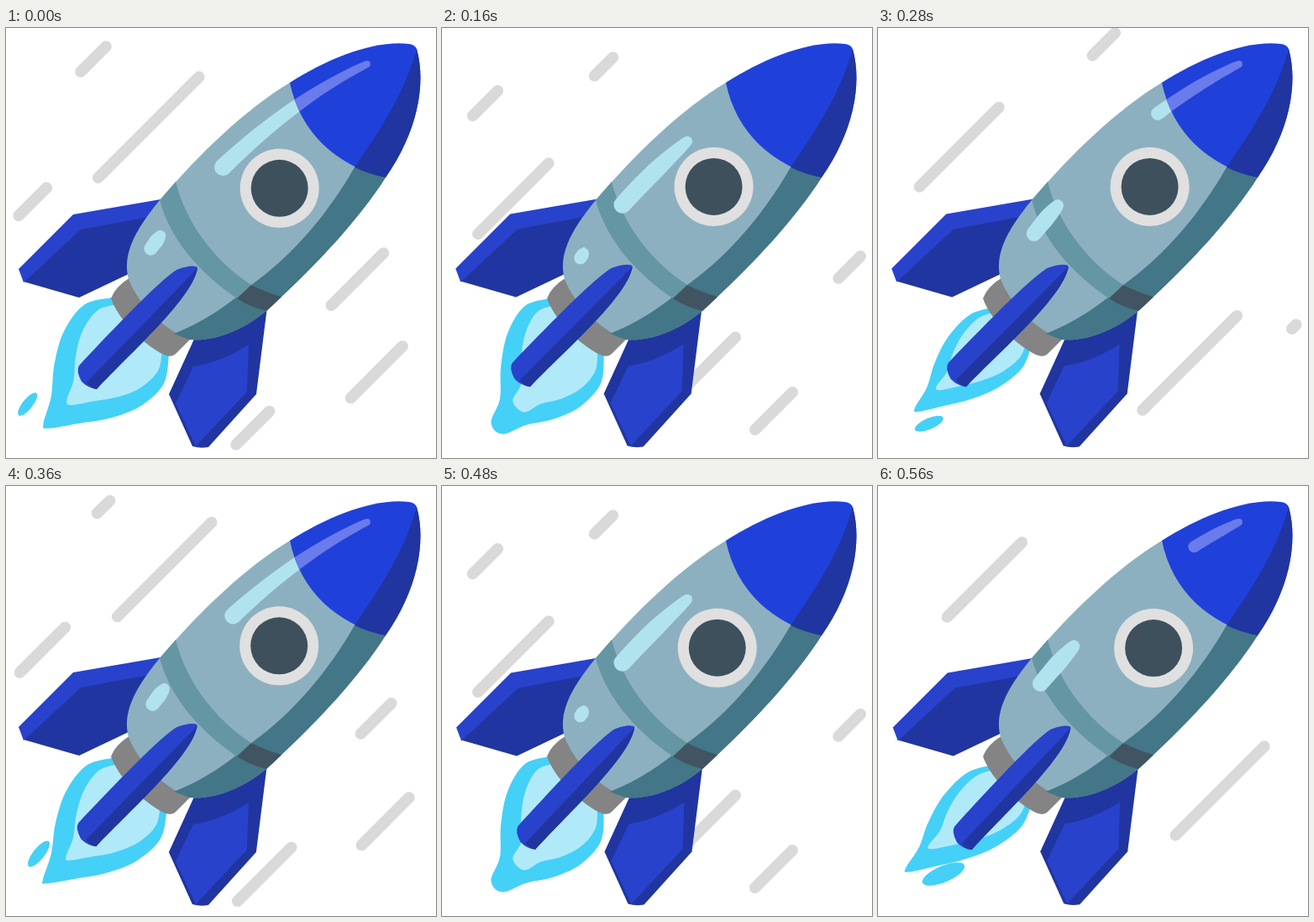
Recreate the animation shown at these times as an HTML page with a canvas. Size 512 by 512 pixels, loop 600 ms.

```html
<!DOCTYPE html>
<html lang="en">
<head>
<meta charset="utf-8">
<title>Rocket</title>
<style>
  html, body { margin: 0; width: 100%; height: 100%; overflow: hidden; background: #fff; }
  canvas { display: block; width: 512px; height: 512px; }
</style>
</head>
<body>
<canvas id="stage" width="512" height="512"></canvas>
<script>
const ctx = document.getElementById('stage').getContext('2d');
const LOOP = 600, STEP = 40, HOLD = 120, CYCLE = 320;
const BRIGHT = '#2842cb', DARK = '#2035a0', NOSE = '#2040da', FIRE = '#45d0f8', CORE = '#b0eaf8';

const shape = {
  body: 'M338 65C285 97 232 148 183 205C150 245 139 272 146 299C160 335 195 362 218 371C250 374 292 358 328 320C372 279 420 228 452 178Z',
  shade: 'M415 166C385 218 345 268 292 306C262 332 235 350 200 364L218 371C250 374 292 358 328 320C372 279 420 228 452 178Z',
  band: 'M202 183C214 230 245 275 292 306L275 322C228 290 195 250 183 205Z',
  bandShade: 'M292 306Q310 315 328 320L310 337Q290 332 275 322Z',
  nose: 'M338 65C385 35 440 14 480 19Q487 20 489 25C501 68 489 125 452 178C395 165 350 125 338 65Z',
  noseShade: 'M489 25C475 75 450 115 415 166Q432 174 452 178C489 125 501 68 489 25Z',
  nozzle: 'M148 297Q130 308 125 322C133 345 160 375 188 389Q197 393 202 388L219 371Z',
  leftEdge: 'M15 287L80 222L190 203L175 224L89 240L21 303Z',
  leftFace: 'M21 302L88 239L180 218L150 291L87 321Z',
  rightFin: 'M226 366L311 332L298 436L241 499Q231 501 222 498L194 436Z',
  rightFace: 'M223 403Q256 398 289 377L287 433L226 498L202 447Z',
  fin: 'M228 286C228 282 215 283 203 288C188 298 160 324 87 402Q83 408 90 421Q98 429 108 430C150 385 222 322 228 286Z',
  finShade: 'M228 286L96 422Q101 429 108 430C150 385 222 322 228 286Z'
};
for (const k in shape) shape[k] = new Path2D(shape[k]);

// Each streak runs down the line x + y = sum, from x = high to x = low.
const streaks = [
  { sum: 141, high: 125, low: 35, born: 25, life: 155 },
  { sum: 717.5, high: 463, low: 290, born: 20, life: 160 },
  { sum: 238.5, high: 205, low: 15, born: 145, life: 235 },
  { sum: 770, high: 500, low: 274, born: 145, life: 235 },
  { sum: 288, high: 284, low: 38, born: 265, life: 250 },
  { sum: 851, high: 498, low: 370, born: 275, life: 240 }
];

const drops = [
  { born: 240, life: 70, x: 78, y: 462, dx: -30, dy: 16, size: 27, angle: -0.4 },
  { born: 40, life: 60, x: 39, y: 438, dx: -40, dy: 30, size: 19, angle: -0.9 }
];

const wave = (phase, peak, period = CYCLE) => Math.cos((phase - peak) / period * 2 * Math.PI);
const since = (phase, born) => (phase - born + CYCLE) % CYCLE;

function fill(path, color) {
  ctx.fillStyle = color;
  ctx.fill(path);
}

function disc(x, y, r, color) {
  const path = new Path2D();
  path.arc(x, y, r, 0, 7);
  fill(path, color);
}

function clipped(area, path, color) {
  ctx.save();
  ctx.clip(area);
  fill(path, color);
  ctx.restore();
}

function moved(matrix, draw) {
  ctx.save();
  ctx.transform(...matrix);
  draw();
  ctx.restore();
}

// The front end eases out while the back end eases in.
function drawStreaks(phase) {
  ctx.strokeStyle = '#d9d9d9';
  ctx.lineWidth = 13.5;
  ctx.lineCap = 'round';
  for (const { sum, high, low, born, life } of streaks) {
    const age = since(phase, born) / life;
    const front = 1 - Math.max(0, 1 - age) ** 2;
    const back = (age / 1.12) ** 1.7;
    if (back >= 1) continue;
    const a = high + (low - high) * front, b = high + (low - high) * back;
    ctx.beginPath();
    ctx.moveTo(a, sum - a);
    ctx.lineTo(b, sum - b);
    ctx.stroke();
  }
}

// Smooth open curve through points.
function spline(path, pts) {
  const p = i => pts[Math.max(0, Math.min(pts.length - 1, i))];
  path.moveTo(...pts[0]);
  for (let i = 0; i < pts.length - 1; i++) {
    const a = p(i - 1), b = p(i), c = p(i + 1), d = p(i + 2);
    path.bezierCurveTo(
      b[0] + (c[0] - a[0]) / 6, b[1] + (c[1] - a[1]) / 6,
      c[0] - (d[0] - b[0]) / 6, c[1] - (d[1] - b[1]) / 6, ...c);
  }
}

// Teardrop along the rocket axis: it swells, stretches and sways over a cycle.
const flameProfile = [[0, 0.72], [0.18, 1], [0.42, 0.95], [0.64, 0.68], [0.82, 0.34]];

function drawFlame(phase, wide, long, color) {
  const width = (58 + 14 * wave(phase, 105)) * wide;
  const length = (157 + 7 * wave(phase, 55, 160)) * long;
  const sway = -16 + 35 * since(phase, 240) / 240;
  const blunt = 3 + 11 * Math.max(0, wave(phase, 125)) ** 2;
  const point = (along, across) =>
    [160 + (across - along) * Math.SQRT1_2, 355 + (across + along) * Math.SQRT1_2];
  const side = sign => flameProfile.map(([f, w]) =>
    point(f * length, (sway + 4) * f + sign * w * width));
  const tip = [-1, 1].map(sign => point(length, sway + sign * blunt));
  const path = new Path2D();
  spline(path, [...side(-1), ...tip, ...side(1).reverse()]);
  fill(path, color);
}

function drawDrops(phase) {
  for (const d of drops) {
    const age = since(phase, d.born) / d.life;
    if (age >= 1) continue;
    const size = d.size * (1 - age * age);
    const path = new Path2D();
    path.ellipse(d.x + d.dx * age, d.y + d.dy * age, size, size * 0.36, d.angle, 0, 7);
    fill(path, FIRE);
  }
}

// Glints slide along the hull, slowing down; up to two share the hull at once.
function glintPath(phase) {
  const path = new Path2D();
  const decay = (age, tau) => 1 - Math.exp(-Math.max(0, age) / tau);
  for (let age = since(phase, 200); age <= 600; age += CYCLE) {
    const front = decay(age, 185), back = decay(age - 180, 145);
    for (let i = 0; i <= 300; i++) {
      const f = i / 300, u = back + (front - back) * f;
      const x = 430 - 276 * u;
      const y = 43 + 130 * u + 108 * u * u + 10 * u ** 12;
      const r = (6.5 + 4 * Math.sin(Math.PI * u * u)) * (0.6 + 0.4 * Math.sqrt(Math.min(1, f * 2)));
      path.moveTo(x + r, y);
      path.arc(x, y, r, 0, 7);
    }
  }
  return path;
}

function draw(t) {
  const phase = t % CYCLE;
  const roll = -wave(t, 220, 2 * CYCLE);
  const roll2 = roll * roll;

  ctx.fillStyle = '#fff';
  ctx.fillRect(0, 0, 512, 512);
  drawStreaks(phase);
  drawFlame(phase, 1, 1, FIRE);
  drawFlame(phase, 0.76, 0.76, CORE);
  drawDrops(phase);
  fill(shape.nozzle, '#848484');

  moved([1, 0, 0, 1, 2.3 * roll2 + 0.5 * roll, 0.5 * roll], () => {
    fill(shape.leftFace, DARK);
    fill(shape.leftEdge, BRIGHT);
  });
  moved([1, 0, 0, 1, 0.5 * roll - 1.3 * roll2, -0.8 * roll2], () => {
    fill(shape.rightFin, DARK);
    fill(shape.rightFace, BRIGHT);
  });

  const glint = glintPath(phase);
  fill(shape.body, '#8db0c0');
  fill(shape.shade, '#437687');
  fill(shape.band, '#6596a4');
  fill(shape.bandShade, '#415462');
  clipped(shape.body, glint, '#b1e3ef');
  fill(shape.nose, NOSE);
  fill(shape.noseShade, DARK);
  clipped(shape.nose, glint, '#6a7bec');

  const wx = 325.7 + 2.5 * roll, wy = 190.8 + 2.3 * roll;
  disc(wx, wy, 47, '#e0e0e0');
  disc(wx, wy, 34, '#3e505c');

  moved([1 - 0.019 * roll, -0.011 * roll, 0, 1, 5.8 * roll, 4.55 * roll], () => {
    fill(shape.fin, BRIGHT);
    fill(shape.finShade, DARK);
  });
}

function tick() {
  const ms = performance.now() % LOOP;
  draw(ms < HOLD ? HOLD / 2 : Math.floor(ms / STEP) * STEP);
  requestAnimationFrame(tick);
}
tick();
</script>
</body>
</html>
```
